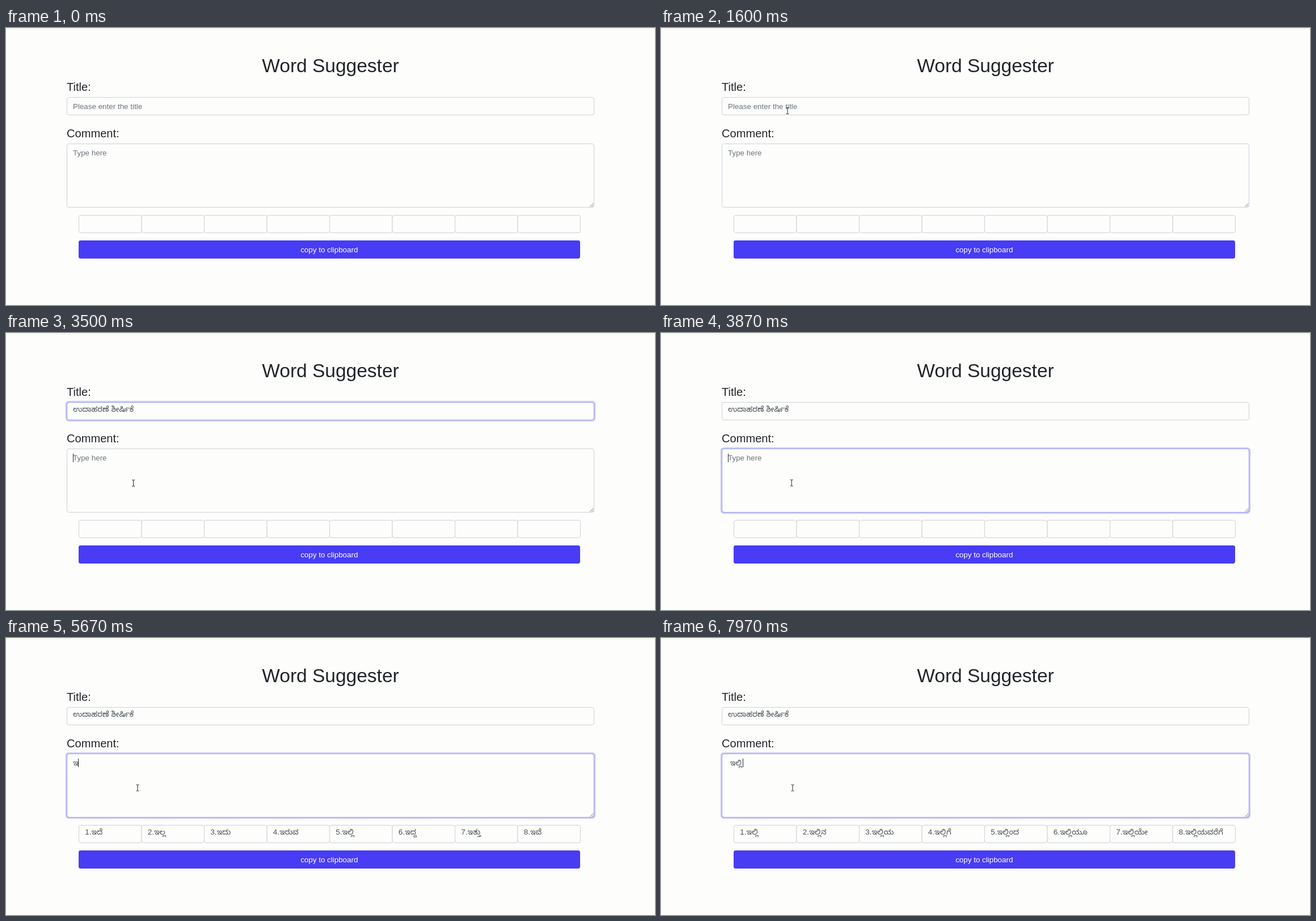
Animation of 1144 by 489 pixels, one loop 8 s. Source, as an HTML page:

```html
<!DOCTYPE html>
<html lang="en">
<head>
<meta charset="utf-8">
<title>Word Suggester</title>
<style>
  html, body { margin: 0; width: 100%; height: 100%; overflow: hidden; background: #fdfdfc; }
  svg { display: block; width: 1144px; height: 489px; }
  text { font: 13.4px "Liberation Sans", Arial, "Noto Sans Kannada", "Noto Sans", sans-serif; fill: #495057; white-space: pre; }
  .head { fill: #212529; }
  .hint { fill: #6c757d; }
  .box { fill: #fdfdfc; stroke: #ced1d7; }
  .glow { fill: none; stroke: #483cf4; stroke-opacity: .25; stroke-width: 2.7; }
  .edge { fill: none; stroke: #939ef0; }
</style>
</head>
<body>
<svg viewBox="0 0 1144 489">
  <rect width="1144" height="3" fill="#f7f7f1"/>
  <text class="head" x="572" y="77.5" text-anchor="middle" style="font-size:33.5px">Word Suggester</text>
  <text class="head" x="107" y="110.5" style="font-size:20.1px">Title:</text>
  <text class="head" x="107" y="192.5" style="font-size:20.1px">Comment:</text>
  <g id="fields"></g>
  <path d="M1029.5 315.5l6-6M1033 315.5l2.5-2.5" stroke="#777" fill="none"/>
  <text id="title" x="118" y="142.5"></text>
  <text id="comment" x="118" y="224.5"></text>
  <g id="words"></g>
  <rect x="128" y="375" width="884" height="32" rx="3.4" fill="#483cf4"/>
  <text x="569.8" y="395.5" text-anchor="middle" style="fill:#fff">copy to clipboard</text>
  <path id="caret" stroke="#222"/>
  <path id="arrow" d="M0 0V12.5L2.9 9.8L5 14.4L7 13.5L5 9H9Z" fill="#000" stroke="#fff" stroke-width=".6"/>
  <path id="beam" d="M-2.5 -5.5H-.5L0 -5L.5 -5.5H2.5M0 -5V5M-2.5 5.5H-.5L0 5L.5 5.5H2.5" fill="none" stroke="#222"/>
</svg>
<script>
const $ = id => document.getElementById(id);
const LOOP = 8000, BLINK = 530, FADE = 150;
const FOCUS = 1900, PASTE = 2800, SWITCH = 3490, TYPE = 4500, PICK = 6500, REFRESH = 7100;

const first = ['ಇದೆ', 'ಇಲ್ಲ', 'ಇದು', 'ಇರುವ', 'ಇಲ್ಲಿ', 'ಇದ್ದ', 'ಇತ್ತು', 'ಇವೆ'];
const second = ['', 'ನ', 'ಯ', 'ಗೆ', 'ಂದ', 'ಯೂ', 'ಯೇ', 'ಯವರೆಗೆ'].map(end => 'ಇಲ್ಲಿ' + end);

// Pointer path: time, x, y
const path = [[350, 190, -20], [730, 212, 120], [1300, 223, 146], [3000, 223, 146],
  [3400, 224.5, 265], [3600, 224.5, 265], [4000, 232, 264.5]];

// Caret resets: time, x, top
const carets = [[FOCUS, 118.5, 131], [PASTE, 224.5, 131], [SWITCH, 118.5, 213],
  [TYPE, 127.5, 213], [PICK, 144.5, 213]];

const rect = (cls, x, y, w, h, grow = 0) =>
  `<rect class="${cls}" x="${x - grow}" y="${y - grow}" width="${w + 2 * grow}" height="${h + 2 * grow}" rx="${3.4 + grow}"/>`;
const field = (id, y, h) => rect('box', 107.5, y, 929, h) +
  `<g id="${id}">${rect('glow', 107.5, y, 929, h, 1.5)}${rect('edge', 107.5, y, 929, h)}</g>`;

$('fields').innerHTML = field('titleFocus', 122.5, 31) + field('commentFocus', 204.5, 112);
$('words').innerHTML = first.map((_, i) => {
  const x = 128.5 + i * 110.5;
  return rect('box', x, 330.5, 110.5, 31) + `<text x="${x + 10.8}" y="347"></text>`;
}).join('');
const wordTexts = [...$('words').querySelectorAll('text')];

const clamp = v => Math.max(0, Math.min(1, v));
const ease = v => v * v * (3 - 2 * v);
const fade = (t, start) => ease(clamp((t - start) / FADE));

function write(el, text, hint, x, y) {
  el.textContent = text;
  el.setAttribute('class', hint ? 'hint' : '');
  el.setAttribute('x', x);
  el.setAttribute('y', y);
}

function pointerAt(t) {
  let [, x, y] = path[0];
  for (let i = 1; i < path.length; i++) {
    const [t0, x0, y0] = path[i - 1], [t1, x1, y1] = path[i];
    if (t < t0) break;
    const k = ease(clamp((t - t0) / (t1 - t0)));
    x = x0 + (x1 - x0) * k;
    y = y0 + (y1 - y0) * k;
  }
  return [x, y];
}

function draw(t) {
  $('titleFocus').style.opacity = fade(t, FOCUS) - fade(t, SWITCH + 15);
  $('commentFocus').style.opacity = fade(t, SWITCH + 15);

  const titled = t >= PASTE, typed = t >= TYPE, picked = t >= PICK;
  write($('title'), titled ? 'ಉದಾಹರಣೆ ಶೀರ್ಷಿಕೆ' : 'Please enter the title', !titled, 118, titled ? 138.5 : 142.5);
  write($('comment'), picked ? 'ಇಲ್ಲಿ' : typed ? 'ಇ' : 'Type here', !typed, picked ? 121.7 : 118, 224.5);

  const list = t >= REFRESH ? second : first;
  wordTexts.forEach((el, i) => el.textContent = typed ? `${i + 1}.${list[i]}` : '');

  const caret = carets.filter(c => t >= c[0]).pop();
  const lit = caret && Math.floor((t - caret[0]) / BLINK) % 2 === 0;
  $('caret').setAttribute('d', lit ? `M${caret[1]} ${caret[2]}v15` : '');

  const [x, y] = pointerAt(t);
  const inField = y > 123 && y < 154 || y > 205 && y < 317;
  $('arrow').style.display = inField ? 'none' : '';
  $('beam').style.display = inField ? '' : 'none';
  for (const id of ['arrow', 'beam']) $(id).setAttribute('transform', `translate(${x} ${y})`);
}

const start = performance.now();
function frame() {
  draw((performance.now() - start) % LOOP);
  requestAnimationFrame(frame);
}
frame();
</script>
</body>
</html>
```
